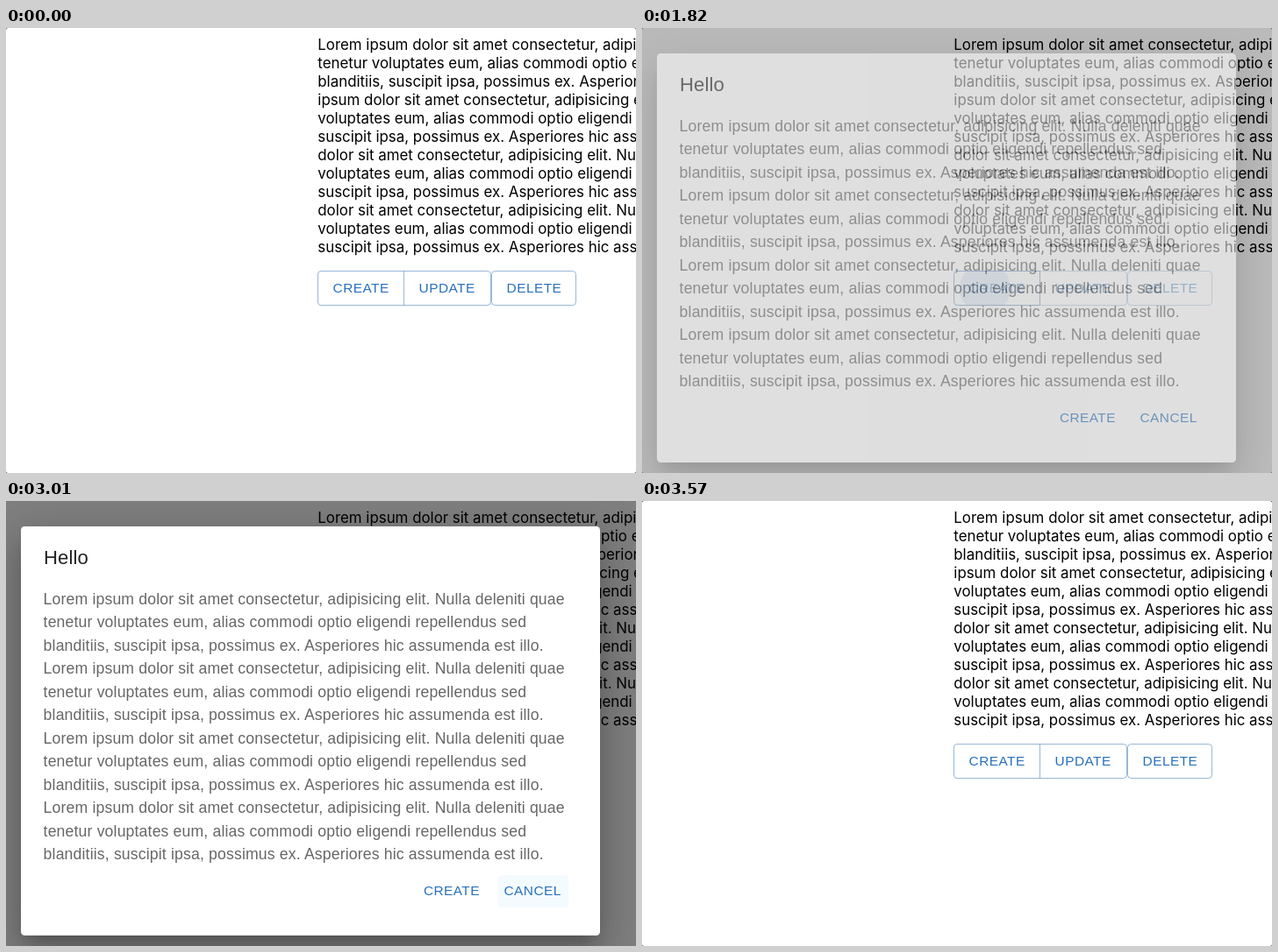
Write an HTML page that moves like this. It is 718 by 508 pixels and loops after 4.83 s.

```html
<!DOCTYPE html>
<html lang="en">
<head>
<meta charset="utf-8">
<title>Dialog</title>
<style>
html, body { margin: 0; width: 100%; height: 100%; overflow: hidden; background: #555; }
div { position: absolute; box-sizing: border-box; white-space: pre; }
#stage { left: 0; top: 0; width: 718px; height: 508px; overflow: hidden; background: #fff; border-radius: 2.5px; }
#text { left: 355.3px; top: 8.5px; font: 16.88px/21px Inter, sans-serif; color: #000; }
#backdrop, #dialog { inset: 0; }
#backdrop { background: rgba(0, 0, 0, .5); }
#paper {
  left: 17px; top: 29px; width: 660px; height: 467px; border-radius: 4.4px; background: #fff;
  box-shadow: 0 12px 17px -8px rgba(0, 0, 0, .2), 0 26px 42px 3px rgba(0, 0, 0, .14), 0 10px 51px 9px rgba(0, 0, 0, .12);
}
#dialog, .btn { font-family: "Liberation Sans", Arial, sans-serif; }
#title { left: 43px; top: 49.5px; font-size: 22.04px; line-height: 30px; letter-spacing: .0075em; color: rgba(0, 0, 0, .87); }
#body { left: 42.6px; top: 99px; font-size: 17.63px; line-height: 26.45px; letter-spacing: .00938em; color: rgba(0, 0, 0, .6); }
.btn { font-size: 15.43px; letter-spacing: .02857em; color: #2870bc; overflow: hidden; }
.box { top: 277px; height: 40px; line-height: 37px; padding-left: 16.6px; border: 1px solid rgba(50, 112, 175, .5); border-radius: 4.4px; }
#create { left: 355px; width: 99px; border-radius: 4.4px 0 0 4.4px; }
#update { left: 453px; width: 100px; border-radius: 0 4.4px 4.4px 0; }
#delete { left: 553px; width: 97px; }
.flat { top: 427px; height: 37px; line-height: 35px; border-radius: 4.4px; }
#confirm { left: 475.9px; }
#cancel { left: 561px; width: 80px; padding-left: 6.5px; }
.ripple { border-radius: 50%; background: #2874c8; }
</style>
</head>
<body>
<div id="stage">
  <div id="text"></div>
  <div id="create" class="btn box">CREATE<div class="ripple"></div></div>
  <div id="update" class="btn box">UPDATE</div>
  <div id="delete" class="btn box">DELETE</div>
  <div id="backdrop"></div>
  <div id="dialog">
    <div id="paper"></div>
    <div id="title">Hello</div>
    <div id="body"></div>
    <div id="confirm" class="btn flat">CREATE</div>
    <div id="cancel" class="btn flat">CANCEL<div class="ripple"></div></div>
  </div>
</div>
<script>
const LOOP = 4830, STEP = 70;
const $ = id => document.getElementById(id);

const passage = [
  'Lorem ipsum dolor sit amet consectetur, adipisicing elit. Nulla deleniti quae',
  'tenetur voluptates eum, alias commodi optio eligendi repellendus sed',
  'blanditiis, suscipit ipsa, possimus ex. Asperiores hic assumenda est illo.'
];
$('body').textContent = Array(4).fill(passage.join('\n')).join('\n');

const cycle = [
  'voluptates eum, alias commodi optio eligendi repellendus sed blanditiis,',
  'suscipit ipsa, possimus ex. Asperiores hic assumenda est illo. Lorem ipsum',
  'dolor sit amet consectetur, adipisicing elit. Nulla deleniti quae tenetur'
];
$('text').textContent = [
  ...passage,
  'ipsum dolor sit amet consectetur, adipisicing elit. Nulla deleniti quae tenetur',
  ...cycle, ...cycle, ...cycle.slice(0, 2)
].join('\n');

// cubic-bezier(.4, 0, .2, 1), solved by bisection
function ease(x) {
  if (x <= 0) return 0;
  if (x >= 1) return 1;
  let lo = 0, hi = 1, s;
  for (let i = 0; i < 24; i++) {
    s = (lo + hi) / 2;
    if (1.2 * s * (1 - s) ** 2 + .6 * s * s * (1 - s) + s ** 3 < x) lo = s;
    else hi = s;
  }
  return s * s * (3 - 2 * s);
}

function ripple(id, x, y, size, age, on) {
  const e = ease(age / 550), r = size * e;
  Object.assign($(id).querySelector('.ripple').style, {
    left: x - r + 'px', top: y - r + 'px', width: 2 * r + 'px', height: 2 * r + 'px',
    opacity: on ? .1 + .2 * e : 0
  });
}

function render(t) {
  const hover = t < 1960 ? ease((t - 1085) / 250) : 0;
  const blue = a => `rgba(50, 112, 175, ${a})`;
  const edge = blue(.5 + .5 * hover);
  $('create').style.borderColor = `${edge} ${blue(hover)} ${edge} ${edge}`;
  $('create').style.background = blue(.04 * hover);
  ripple('create', 35, 19, 66, t - 1640, t >= 1680 && t < 1960);

  const shown = t < 2500 ? ease((t - 1738) / 225) : 1 - ease((t - 3318) / 195);
  $('backdrop').style.opacity = $('dialog').style.opacity = shown;
  $('cancel').style.background = t >= 3010 ? '#f4fbfe' : 'none';
  ripple('cancel', 43.5, 17.5, 72, t - 3215, t >= 3290);
}

function tick() {
  const t = performance.now() % LOOP;
  render(Math.floor(t / STEP) * STEP);
  requestAnimationFrame(tick);
}
tick();
</script>
</body>
</html>
```
